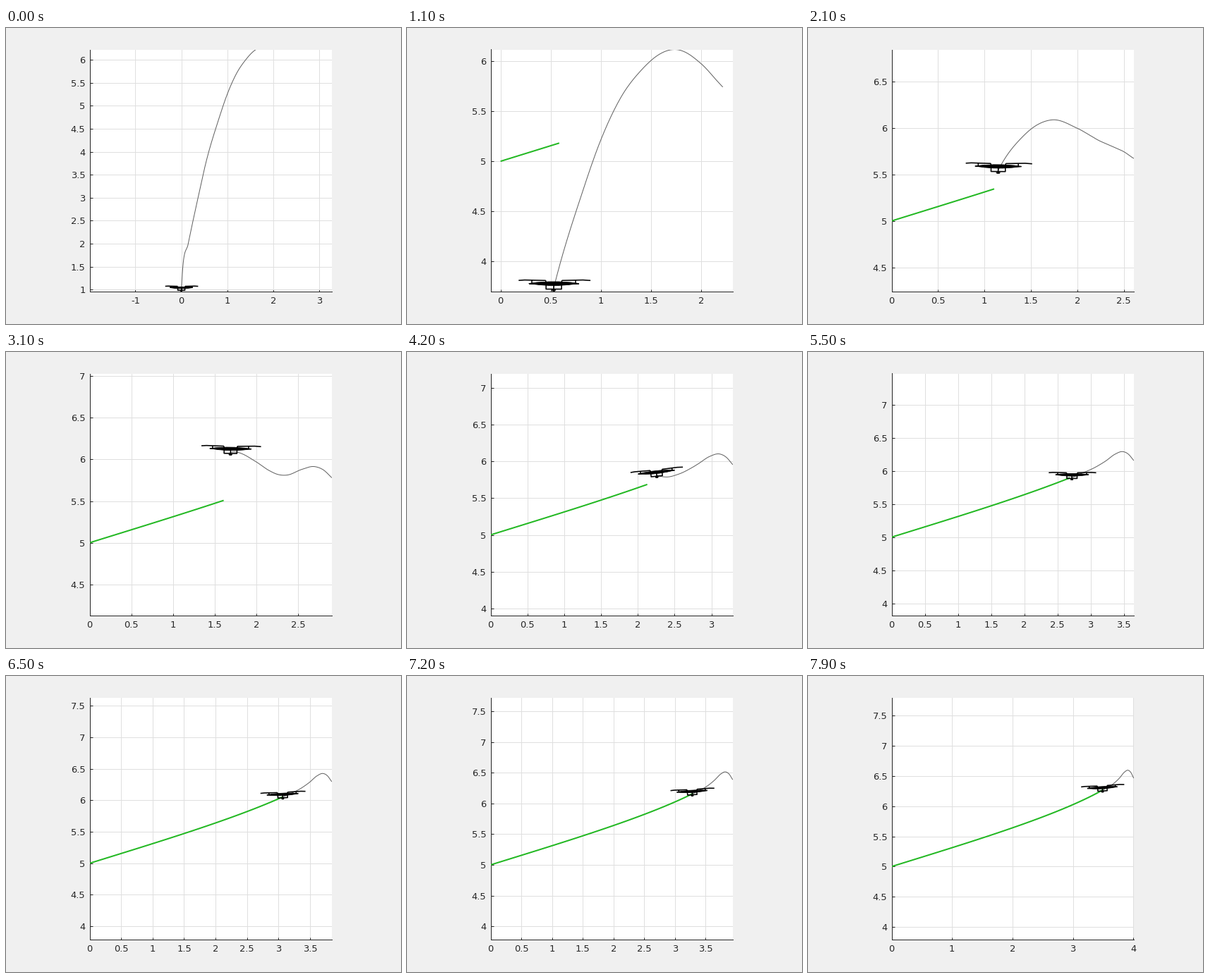
Recreate the animation shown at these times as a matplotlib script. Size 560 px wide and 420 px high, loop 8 s.

```python
import numpy as np
import matplotlib.pyplot as plt
from matplotlib.animation import FuncAnimation
from matplotlib.collections import LineCollection
from matplotlib.patches import Polygon
from matplotlib.ticker import FuncFormatter, MultipleLocator

W, H, DPI = 560, 420, 72
FRAMES, STEP = 80, 100
HORIZON = 3.0
INK = "#262626"


def curve(x, pts):
    """Smooth cubic Hermite curve through (x, y) points."""
    xs, ys = np.array(pts, float).T
    m = np.gradient(ys, xs)
    i = np.clip(np.searchsorted(xs, x, side="right") - 1, 0, len(xs) - 2)
    h = xs[i + 1] - xs[i]
    u = (x - xs[i]) / h
    return ((1 + 2 * u) * (1 - u) ** 2 * ys[i] + u * (1 - u) ** 2 * h * m[i]
            + u * u * (3 - 2 * u) * ys[i + 1] + u * u * (u - 1) * h * m[i + 1])


def guide(t):
    return 4.1 * np.sin(0.13 * t), 5 + 0.1655 * t - 0.0005 * t * t


# Flown path: climb, overshoot, then settle onto the guide line
PATH = [(0, 1), (.02, 1.33), (.15, 2.0), (.37, 3.03), (.53, 3.74), (.81, 4.68),
        (1, 5.22), (1.2, 5.64), (1.4, 5.9), (1.55, 6.03), (1.73, 6.09),
        (2, 5.975), (2.15, 5.87), (2.257, 5.812), (2.39, 5.79), (2.55, 5.83),
        (2.72, 5.9)] + [guide(t) for t in np.arange(6, 11.7, 0.3)]
DRONE_X = [(0, 0), (.3, .03), (.6, .2), (1.1, .53), (1.8, .97), (2.4, 1.32),
           (3.1, 1.69), (4.2, 2.257), (5.5, 2.72), (6.5, 3.066), (7.9, 3.49)]
TILT = [(0, 0), (1.1, 0), (2.2, -.5), (3.1, -.8), (4.2, 6), (5.5, 0),
        (6.5, 2.7), (7.9, 3.3)]
LEAD = [(0, .062), (1.1, .127), (1.8, .107), (3.1, -.02), (4.2, -.014),
        (5.5, -.015), (6.5, -.03), (7.9, -.048)]
TAIL = [(0, 0), (.4, 0), (.55, .02), (.7, .052), (.83, .025), (.918, -.062),
        (1, -.2)]

# Drone outline, relative to its position
BODY = np.array([(-.25, .042), (-.17, .053), (-.05, .060), (.05, .060),
                 (.17, .053), (.25, .042), (.15, .029), (.05, .022),
                 (-.05, .022), (-.15, .029)])
PARTS = [np.array(p) for p in (
    [(-.35, .073), (-.29, .077), (-.08, .072)],
    [(.08, .072), (.29, .077), (.365, .072)],
    [(-.216, .073), (-.216, .044)],
    [(.216, .073), (.216, .044)],
    [(-.25, .042), (.25, .042)],
    [(-.08, .072), (-.077, .03), (-.077, -.014), (.077, -.014),
     (.077, .03), (.08, .072)],
    [(0, .03), (0, -.03)],
    [(-.022, -.026), (.022, -.026)],
    [(-.016, -.032), (.016, -.032)],
)]

fig = plt.figure(figsize=(W / DPI, H / DPI), dpi=DPI, facecolor="#f0f0f0")
ax = fig.add_axes([118.5 / W, 46.5 / H, 343 / W, 343 / H])
ax.set_axisbelow(True)
ax.grid(True, color="#dfdfdf", lw=1)
for side in ("top", "right"):
    ax.spines[side].set_visible(False)
for side in ("left", "bottom"):
    ax.spines[side].set(color=INK, linewidth=1)
ax.tick_params(direction="in", length=3.5, width=1, color=INK,
               labelcolor=INK, labelsize=13, labelfontfamily="DejaVu Sans")
ax.tick_params(axis="x", pad=7.5)
ax.tick_params(axis="y", pad=6)
for axis in (ax.xaxis, ax.yaxis):
    axis.set_major_formatter(FuncFormatter(lambda v, _: f"{round(v, 6) + 0:g}"))
ax.yaxis.set_major_locator(MultipleLocator(0.5))

trail, = ax.plot([], [], color="#22b822", lw=2, solid_capstyle="butt", zorder=3)
plan, = ax.plot([], [], color="#606060", lw=1, zorder=4)
body = ax.add_patch(Polygon(BODY, fc="black", ec="black", lw=.8, zorder=5))
limbs = ax.add_collection(
    LineCollection(PARTS, colors="black", linewidths=1.6, zorder=6))


def planned_path(t, x0):
    x1 = guide(t + HORIZON)[0] + curve(t, LEAD)
    w = np.linspace(0, 1, 160)
    x = x0 + w * (x1 - x0)
    late = min(1, t / 2.4)
    early = max(0, 1 - t) ** 2
    return x, curve(x, PATH) + late * curve(w, TAIL) + early * .16 * w ** 3


def fit_axes(x_lo, x_hi, y_lo, y_hi):
    """Tight limits with equal scale on both axes."""
    span = max(x_hi - x_lo, y_hi - y_lo)
    cx, cy = (x_lo + x_hi) / 2, (y_lo + y_hi) / 2
    ax.set_xlim(cx - span / 2, cx + span / 2)
    ax.set_ylim(cy - span / 2, cy + span / 2)
    ax.xaxis.set_major_locator(MultipleLocator(1 if span >= 4 else 0.5))


def update(i):
    t = i * STEP / 1000
    x0 = curve(t, DRONE_X)
    y0 = curve(x0, PATH)
    px, py = planned_path(t, x0)
    plan.set_data(px, py)
    trail.set_data(*guide(np.linspace(0, t, 100)))

    a = np.radians(curve(t, TILT))
    rot = np.array([[np.cos(a), np.sin(a)], [-np.sin(a), np.cos(a)]])
    body.set_xy(BODY @ rot + (x0, y0))
    limbs.set_segments([p @ rot + (x0, y0) for p in PARTS])

    fit_axes(min(0, x0 - .35), max(px[-1], x0 + .365),
             min(5, y0 - .035), max(py.max(), y0 + .075))
    return trail, plan, body, limbs


anim = FuncAnimation(fig, update, frames=FRAMES, interval=STEP, repeat=True,
                     repeat_delay=0, blit=False)
plt.show()
```
